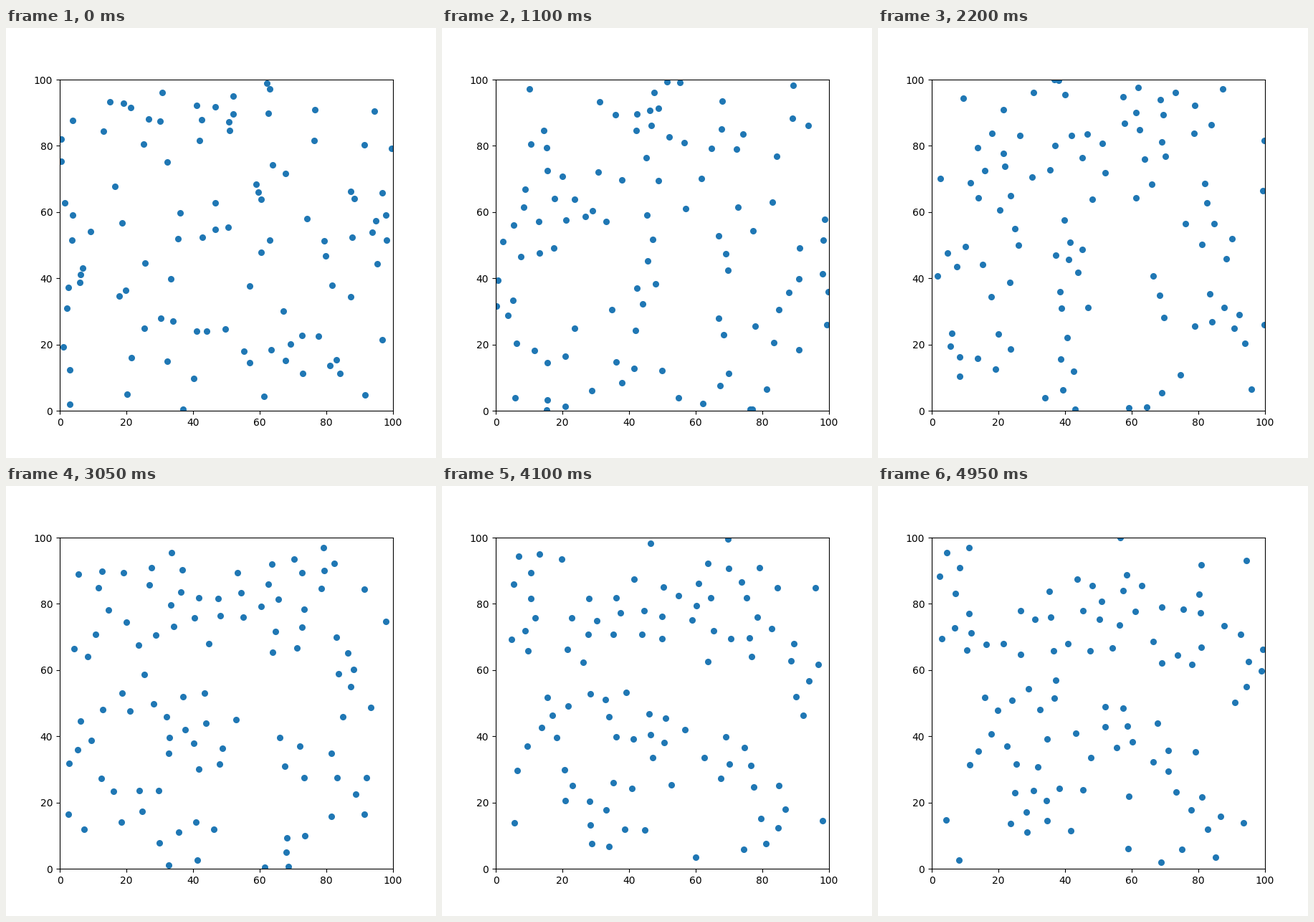
Recreate the animation shown at these times as a matplotlib script. Size 600 by 600 pixels, loop 5 s.

```python
import numpy as np
import matplotlib.pyplot as plt
from matplotlib.animation import FuncAnimation

SIZE = 100
BIRDS = 100
FRAMES = 100
INTERVAL = 50

VIEW = 10          # how far a bird sees its flock
SPACING = 5        # closer than this, birds push apart
COHESION = 0.004
ALIGNMENT = 0.025
SEPARATION = 0.05
MAX_SPEED = 1.4


def step(pos, vel):
    gap = pos[None] - pos[:, None]
    dist = np.hypot(gap[..., 0], gap[..., 1])
    others = ~np.eye(len(pos), dtype=bool)
    near = (others & (dist < VIEW)).astype(float)
    crowd = (others & (dist < SPACING)).astype(float)

    count = near.sum(axis=1, keepdims=True)
    share = near / np.maximum(count, 1)
    centre = (share[..., None] * gap).sum(axis=1)
    heading = np.where(count > 0, share @ vel - vel, 0)
    push = -(crowd[..., None] * gap).sum(axis=1)

    vel = vel + COHESION * centre + ALIGNMENT * heading + SEPARATION * push
    speed = np.linalg.norm(vel, axis=1, keepdims=True)
    vel = vel * np.minimum(1, MAX_SPEED / np.maximum(speed, 1e-9))
    return (pos + vel) % SIZE, vel


def simulate():
    rng = np.random.default_rng(7)
    pos = rng.uniform(0, SIZE, (BIRDS, 2))
    vel = rng.uniform(-1, 1, (BIRDS, 2))
    track = [pos]
    for _ in range(FRAMES - 1):
        pos, vel = step(pos, vel)
        track.append(pos)
    return track


track = simulate()

fig, ax = plt.subplots(figsize=(6, 6), dpi=100)
ax.set_xlim(0, SIZE)
ax.set_ylim(0, SIZE)
birds, = ax.plot([], [], "o", color="#1f77b4", markersize=5.5)


def draw(frame):
    birds.set_data(*track[frame].T)
    return birds,


anim = FuncAnimation(fig, draw, frames=FRAMES, interval=INTERVAL,
                     repeat=True, repeat_delay=0)
plt.show()
```
